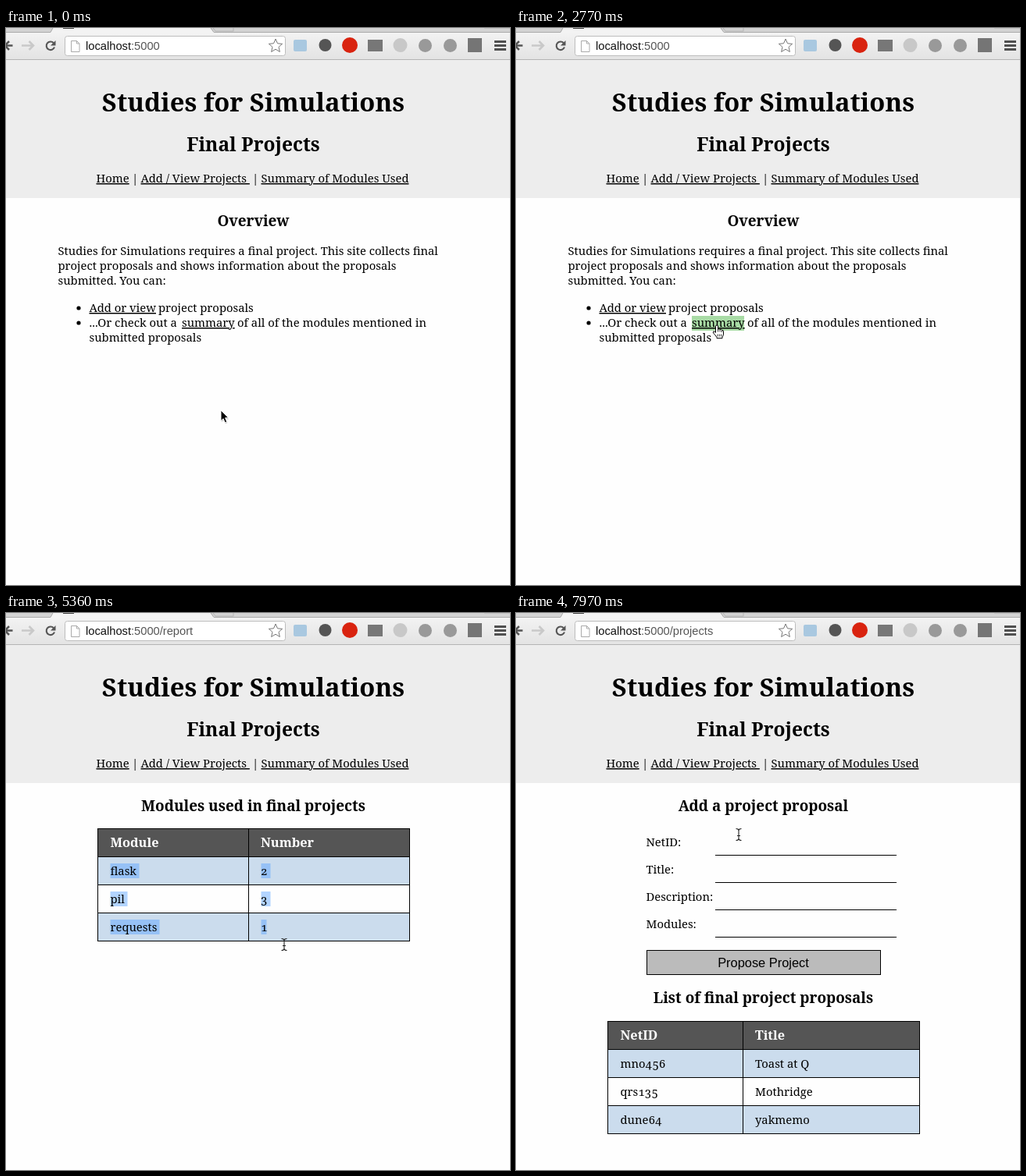
An HTML page for the animation above (8000 ms loop, 645 by 714 pixels).

```html
<!DOCTYPE html>
<html lang="en">
<head>
<meta charset="utf-8">
<title>Final Projects</title>
<style>
  html, body { margin: 0; width: 100%; height: 100%; overflow: hidden; background: #fefefe; }
  svg { display: block; width: 100vw; height: 100vh; }
  text { font-family: "Noto Serif", serif; font-size: 14.8px; font-variant-numeric: oldstyle-nums; white-space: pre; }
  .sans { font-family: "Liberation Sans", Arial, sans-serif; font-variant-numeric: normal; }
  .bold { font-weight: bold; }
  .mid { text-anchor: middle; }
  .link { text-decoration: underline 1px; text-underline-offset: 1.5px; text-decoration-skip-ink: none; }
</style>
</head>
<body>
<svg id="stage" viewBox="0 0 645 714"></svg>
<script>
const LOOP = 8000;
const stage = document.getElementById('stage');

// Drawing helpers
const rect = (x, y, w, h, fill, extra = '') =>
  `<rect x="${x}" y="${y}" width="${w}" height="${h}" fill="${fill}" ${extra}/>`;
const circle = (x, y, r, fill) => `<circle cx="${x}" cy="${y}" r="${r}" fill="${fill}"/>`;
const line = (d, color, width, extra = '') =>
  `<path d="${d}" fill="none" stroke="${color}" stroke-width="${width}" ${extra}/>`;
const text = (x, y, content, cls = '', style = '') =>
  `<text x="${x}" y="${y}" class="${cls}" style="${style}">${content}</text>`;
const heading = (y, size, content) => text(316.5, y, content, 'bold mid', `font-size:${size}px`);
const selected = (x, y, w, h = 19) => rect(x, y, w, h, '#55a0ff', 'fill-opacity=".45"');
const hovered = (x, y, w) => rect(x, y, w, 19, '#a8dba5');

// Pointer: [start, end, x, y] moves, and the shape from a given time on
const START = [275, 490];
const MOVES = [
  [110, 460, 259, 416],
  [880, 1470, 77, 354],
  [1620, 2150, 221, 436],
  [2390, 2770, 257, 381],
  [3750, 3870, 245, 395],
  [3870, 4090, 151, 342],
  [4090, 4370, 131, 329],
  [4480, 5180, 352, 421],
  [5300, 5360, 356, 425],
  [5360, 5560, 350, 476],
  [5790, 6550, 259, 197],
  [7690, 7970, 285, 284],
];
const SHAPES = [
  [0, 'arrow'], [900, 'beam'], [1650, 'arrow'], [2640, 'hand'], [3780, 'arrow'],
  [4200, 'beam'], [5400, 'arrow'], [6480, 'hand'], [7760, 'arrow'], [7880, 'beam'],
];
const POINTERS = {
  arrow: '<path d="M.8 2.5V15l3-2.6 2 4.9 2.6-1-2-4.8h4z" fill="#000" opacity=".2"/>' +
    '<path d="M0 0V13.6L3.1 10.8 5.2 15.8 7.7 14.8 5.6 9.8H9.7Z" fill="#000" stroke="#fff"/>',
  hand: '<path d="M-1.5 8V1.3Q-1.5 0 0 0T1.5 1.3V5.4Q2.6 4.2 4 5.4Q5.4 4.7 6.3 6.3Q8.5 5.9 8.5 8V11Q8.5 13 7 15V16.7H0V15.5Q-1.6 13 -4.6 9.8Q-5 7.3-3 8L-1.5 9.3Z" fill="#fff" stroke="#000"/>' +
    line('M1.5 5V8.5M4 5.5V8.5M6.3 6.5V9M1 11.5V14.5M3.3 11.5V14.5M5.6 11.5V14.5', '#000', .8),
  beam: line('M-3.5-7.5Q-.5-7.5 0-5.5Q.5-7.5 3.5-7.5M0-5.5V5.5M-3.5 7.5Q-.5 7.5 0 5.5Q.5 7.5 3.5 7.5M-2 1.5H2', '#222', 1.1),
};

function pointerAt(t) {
  let [x, y] = START;
  for (const [start, end, toX, toY] of MOVES) {
    if (t <= start) break;
    const p = Math.min(1, (t - start) / (end - start));
    const eased = p * p * (3 - 2 * p);
    x += (toX - x) * eased;
    y += (toY - y) * eased;
  }
  return { x, y };
}

function pointer(t) {
  const { x, y } = pointerAt(t);
  const shape = SHAPES.filter(([from]) => t >= from).pop()[1];
  return `<g transform="translate(${x.toFixed(1)} ${y.toFixed(1)})">${POINTERS[shape]}</g>`;
}

// Browser window
function toolbar(t) {
  const path = t >= 7300 ? '/projects' : t >= 3310 ? '/report' : '';
  const loading = (t >= 3310 && t < 3490) || (t >= 7300 && t < 7390);
  const reload = loading
    ? line('M51.5 17.5L62.5 28.5M62.5 17.5L51.5 28.5', '#555', 2.6)
    : line('M61 19.3A5.3 5.3 0 1 0 62 24.5', '#555', 2.1) + '<path d="M63.5 16V22.5H57Z" fill="#555"/>';
  return `<defs><linearGradient id="bar" x2="0" y2="1">
      <stop stop-color="#f3f3f3"/><stop offset="1" stop-color="#e3e3e3"/></linearGradient></defs>` +
    rect(0, 0, 645, 6, '#d3d3d3') + rect(0, 5, 645, 36, 'url(#bar)') +
    '<path d="M57 6L60 0H262L266 6Z" fill="#f3f3f3"/>' +
    line('M0 5.5H57L60 0M262 0L266 5.5H645', '#aaa', 1) +
    line('M265 0L268 4H291V0M612 0H645', '#b5b5b5', 1) +
    rect(73, 0, 14, 1, '#444') + rect(0, 40, 645, 1, '#b4b4b4') +
    line('M8.5 22.5H0M4 17L-1.5 22.5 4 28', '#555', 2.6) +
    line('M20 22.5H35M29.5 17L35 22.5 29.5 28', '#c9c9c9', 2.6) + reload +
    rect(75.5, 10.5, 282, 25, '#fff', 'rx="3" stroke="#bdbdbd"') +
    line('M83.5 16.5H90.5L94 20V30.5H83.5ZM90.5 16.5V20H94', '#aaa', 1) +
    text(102, 28, `<tspan fill="#111">localhost</tspan><tspan fill="#555">:5000${path}</tspan>`, 'sans', 'font-size:14.7px') +
    line('M345 14L347.5 19.8 353.6 20.3 349 24.4 350.4 30.5 345 27.2 339.6 30.5 341 24.4 336.4 20.3 342.5 19.8Z', '#777', 1) +
    rect(368, 15, 17, 15, '#a9c8e0', 'rx="2"') + circle(408.5, 22, 8, '#555') +
    circle(440, 22, 10, '#d9230f') + rect(463, 15, 19, 15, '#777') +
    circle(504.5, 22, 9, '#c8c8c8') + circle(536.5, 22.5, 8.5, '#999') +
    circle(568.5, 22.5, 8.5, '#999') + rect(591, 13, 18, 18, '#757575') +
    line('M625 17.5H640M625 22.5H640M625 27.5H640', '#505050', 2.8);
}

function header(t) {
  return rect(0, 41, 645, 177, '#ededed') +
    heading(107, 32.7, 'Studies for Simulations') + heading(158, 24.5, 'Final Projects') +
    (t >= 6480 && t < 7750 ? hovered(172.5, 183, 144.5) : '') +
    text(115.5, 198, 'Home', 'link') + text(161, 198, '|') +
    text(172.5, 198, 'Add / View Projects ', 'link') + text(315, 198, '|') +
    text(326.5, 198, 'Summary of Modules Used', 'link');
}

// Table with striped rows; the first row holds the column names
function table(top, split, rows, hoverRow = -1, marks = '') {
  const fill = i => i === 0 ? '#555' : i - 1 === hoverRow ? '#ffffa3' : i % 2 ? '#cbdced' : '#fefefe';
  const cells = rows.map((row, i) => row.map((cell, column) =>
    text(column ? split + 16 : 133.5, top + 24 + 36 * i, cell, i ? '' : 'bold',
      i ? '' : 'fill:#fff;font-size:16.3px')).join('')).join('');
  const rules = rows.map((_, i) => `M117 ${top + 36.5 + 36 * i}H517`).join('');
  return rows.map((_, i) => rect(117, top + 36 * i, 400, 36, fill(i))).join('') + marks + cells +
    line(`M117 ${top + .5}H517${rules}M117.5 ${top}v145M${split + .5} ${top}v145M516.5 ${top}v145`, '#000', 1);
}

// Pages
function homePage(t) {
  let marks = '';
  if (t >= 880 && t < 2450) {
    const { x, y } = pointerAt(Math.min(t, 1470));
    const band = Math.floor((y - 349) / 19);
    [320, 541, 251].forEach((right, i) => {
      const left = i === band ? Math.max(107, x) : 107;
      if (i >= band && left < right) marks += selected(left, 349 + 19 * i, right - left);
    });
  }
  if (t >= 2640) marks += hovered(225, 369, 67);
  return marks + heading(254, 18.9, 'Overview') +
    text(66.5, 291, 'Studies for Simulations requires a final project. This site collects final') +
    text(66.5, 310, 'project proposals and shows information about the proposals') +
    text(66.5, 329, 'submitted. You can:') +
    circle(93, 359, 2.6, '#000') + circle(93, 378, 2.6, '#000') +
    text(106.5, 364, 'Add or view', 'link') + text(195, 364, 'project proposals') +
    text(106.5, 383, '...Or check out a') + text(225, 383, 'summary', 'link') +
    text(296, 383, 'of all of the modules mentioned in') +
    text(106.5, 402, 'submitted proposals');
}

function reportPage(t) {
  const rowAt = y => Math.floor((y - 313) / 36);
  const dragging = t >= 4480 && t < 5180;
  const { y } = pointerAt(t);
  const hoverRow = t < 3780 ? -1 : dragging ? 0 : rowAt(y);
  let marks = '';
  if (t >= 4480 && t < 5520) {
    const drag = pointerAt(Math.min(t, 5360));
    const lastRow = rowAt(drag.y);
    [[37, 12], [22, 12], [63, 7]].forEach((widths, row) => widths.forEach((width, column) => {
      const left = column ? 326.5 : 133.5;
      const reach = row < lastRow ? width : row === lastRow ? Math.min(width, drag.x - left) : 0;
      if (reach > 0) marks += selected(left, 321 + 36 * row, reach);
    }));
  }
  return heading(254, 18.9, 'Modules used in final projects') +
    table(276, 310, [['Module', 'Number'], ['flask', 2], ['pil', 3], ['requests', 1]], hoverRow, marks);
}

function projectsPage() {
  const fields = ['NetID:', 'Title:', 'Description:', 'Modules:'].map((label, i) =>
    text(166.5, 299 + 35 * i, label) + rect(255, 310 + 35 * i, 232, 1, '#000')).join('');
  return heading(254, 18.9, 'Add a project proposal') + fields +
    rect(167.5, 432.5, 299, 31, '#bbb', 'stroke="#000"') +
    text(316.5, 454, 'Propose Project', 'sans mid', 'font-size:16.4px') +
    heading(500, 18.9, 'List of final project proposals') +
    table(523, 290, [['NetID', 'Title'], ['mno456', 'Toast at Q'], ['qrs135', 'Mothridge'], ['dune64', 'yakmemo']]);
}

let shown = '';
function frame(now) {
  const t = now % LOOP;
  const page = t < 3400 ? homePage : t < 7390 ? reportPage : projectsPage;
  const picture = rect(0, 0, 645, 714, '#fefefe') + toolbar(t) + header(t) + page(t) + pointer(t);
  if (picture !== shown) stage.innerHTML = shown = picture;
}

const began = performance.now();
function tick() {
  frame(performance.now() - began);
  requestAnimationFrame(tick);
}
tick();
</script>
</body>
</html>
```
